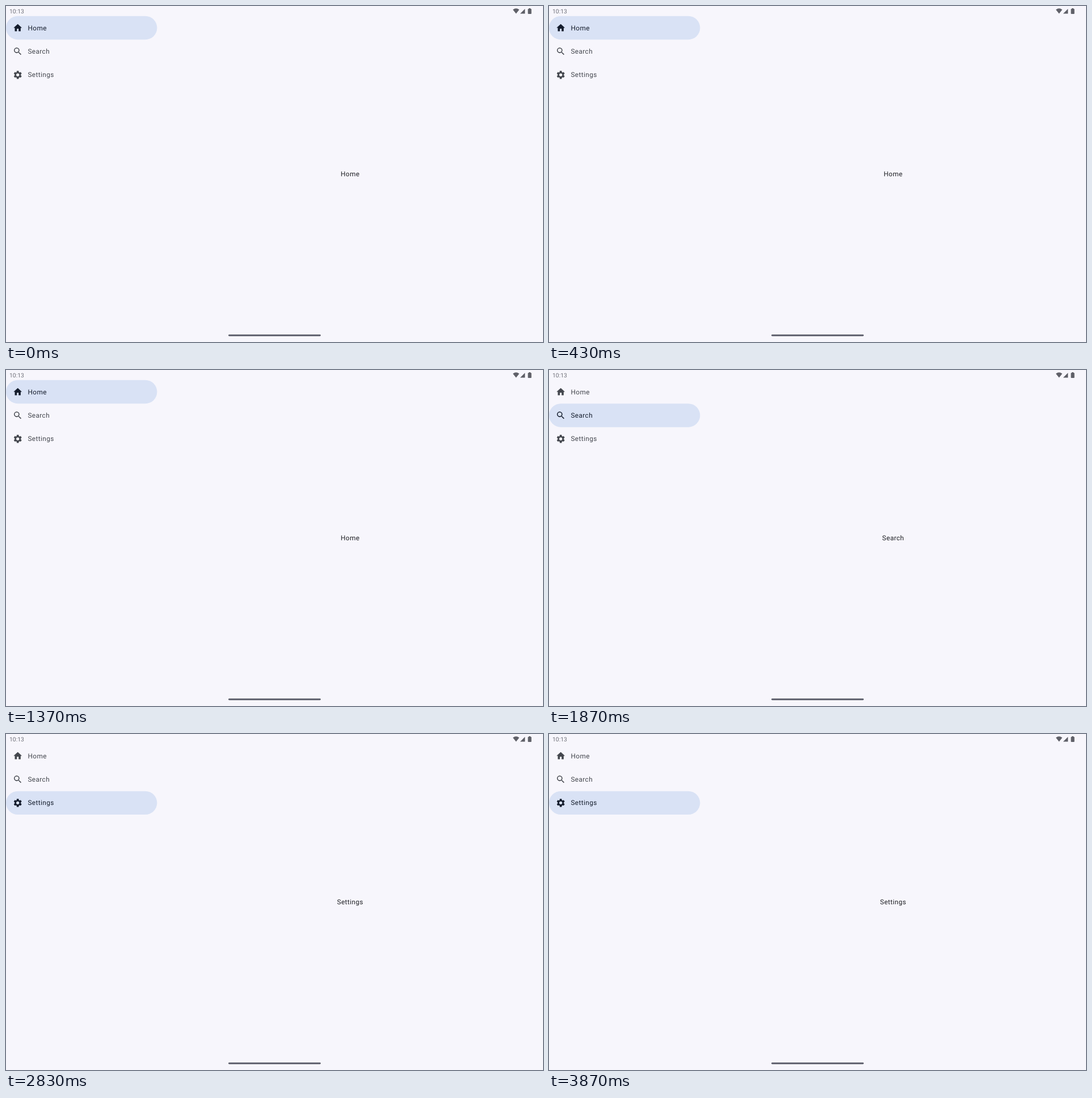
Recreate the animation shown at these times as an HTML page. Size 947 by 592 pixels, loop 3.91 s.

```html
<!DOCTYPE html>
<html lang="en">
<head>
<meta charset="utf-8">
<title>Navigation drawer</title>
<style>
  html, body { margin: 0; width: 100%; height: 100%; overflow: hidden; background: #f7f6fc; }
  svg { display: block; width: 947px; height: 592px; }
  text { font: 400 11.84px Roboto, sans-serif; letter-spacing: .37px; text-rendering: geometricPrecision; }
  .item { fill: #44474e; }
  .item.on { fill: #141c2c; }
  .pill { fill: #d9e2f5; }
  .status { fill: #5f6068; }
  .clock { font-size: 10.36px; letter-spacing: 0; fill: #6f7079; }
  .page { fill: #1f2025; text-anchor: middle; }
</style>
</head>
<body>
<svg id="stage" viewBox="0 0 947 592">
  <rect class="pill" id="pill" width="266.4" height="41.44" rx="20.72"/>
  <text class="clock" x="6" y="13">10:13</text>
  <g class="status">
    <path d="M893.9 6.4Q899.5 2 905.1 6.4L899.5 13.4Z"/>
    <path d="M915.2 5V13.4H906.7Z"/>
    <path d="M922 5V4H925V5H925.7Q926.6 5 926.6 5.9V13Q926.6 13.9 925.7 13.9H921.3Q920.4 13.9 920.4 13V5.9Q920.4 5 921.3 5Z"/>
  </g>
  <g id="menu"></g>
  <text class="page" id="page" x="606.9" y="300.05"></text>
  <rect x="392.2" y="578.7" width="162.8" height="2.96" rx="1.48" fill="#5c5e6b"/>
</svg>
<script>
const LOOP = 3910;
const DP = 0.74;             // pixels per density-independent unit
const TOP = 24 * DP, ROW = 56 * DP;

// Six-toothed gear on a 24-unit grid
function gear() {
  const tooth = [[-2.75, -6.65], [-2.3, -9.5], [2.3, -9.5], [2.75, -6.65]];
  const points = [];
  for (let k = 0; k < 6; k++) {
    const c = Math.cos(k * Math.PI / 3), s = Math.sin(k * Math.PI / 3);
    for (const [x, y] of tooth) {
      points.push((12 + x * c - y * s).toFixed(2) + ' ' + (12 + x * s + y * c).toFixed(2));
    }
  }
  return 'M' + points.join('L') + 'Z M8.4 12a3.6 3.6 0 1 0 7.2 0a3.6 3.6 0 1 0-7.2 0Z';
}

const items = [
  { label: 'Home', from: 0, icon: 'M10 20v-6h4v6h5v-8h3L12 3 2 12h3v8z' },
  { label: 'Search', from: 1800, icon: 'M15.5 14h-.79l-.28-.27A6.5 6.5 0 1 0 13.73 14.43l.27.28v.79l5 4.99L20.49 19zM5 9.5a4.5 4.5 0 1 0 9 0a4.5 4.5 0 1 0-9 0Z' },
  { label: 'Settings', from: 2550, icon: gear() }
];

const byId = id => document.getElementById(id);

function add(parent, tag, attrs) {
  const el = document.createElementNS('http://www.w3.org/2000/svg', tag);
  for (const key in attrs) el.setAttribute(key, attrs[key]);
  return parent.appendChild(el);
}

items.forEach((item, i) => {
  const mid = TOP + ROW * (i + 0.5);
  item.el = add(byId('menu'), 'g', { class: 'item' });
  add(item.el, 'path', {
    d: item.icon,
    'fill-rule': 'evenodd',
    transform: `translate(${16 * DP} ${mid - 12 * DP}) scale(${DP})`
  });
  add(item.el, 'text', { x: 52 * DP, y: mid + 4.05 }).textContent = item.label;
});

let shown = -1;

function select(index) {
  if (index === shown) return;
  shown = index;
  items.forEach((item, i) => item.el.classList.toggle('on', i === index));
  byId('pill').setAttribute('y', TOP + ROW * index);
  byId('page').textContent = items[index].label;
}

const start = performance.now();

function draw(now) {
  const t = Math.max(0, now - start) % LOOP;
  select(items.filter(item => t >= item.from).length - 1);
  requestAnimationFrame(draw);
}

draw(start);
</script>
</body>
</html>
```
